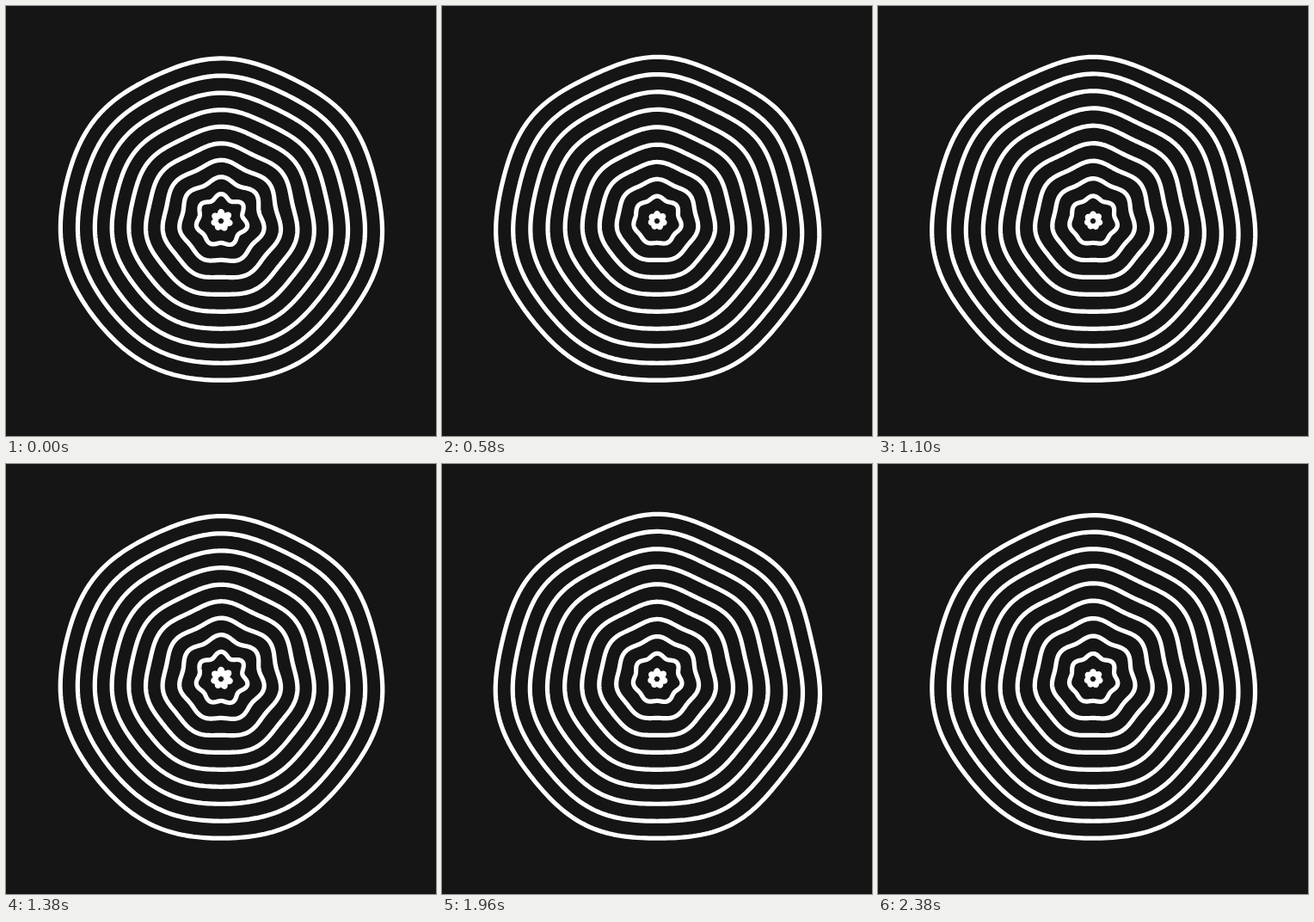
Recreate the animation shown at these times as an HTML page. Size 500 by 500 pixels, loop 2400 ms.

```html
<!DOCTYPE html>
<html lang="en">
<head>
<meta charset="utf-8">
<title>Vibrating rings</title>
<style>
  html, body { margin: 0; width: 100%; height: 100%; overflow: hidden; background: #151515; }
  svg { display: block; width: 100%; height: 100%; }
  path { fill: none; stroke: #fff; stroke-width: 5.2; stroke-linejoin: round; }
</style>
</head>
<body>
<svg viewBox="0 0 500 500"></svg>
<script>
  const RINGS = 10, LOBES = 7, STEP = 20, STEPS = 120, TAU = Math.PI * 2;
  const svg = document.querySelector('svg');
  const rings = Array.from({ length: RINGS }, () =>
    svg.appendChild(document.createElementNS('http://www.w3.org/2000/svg', 'path')));

  const wave = turns => Math.cos(TAU * turns);

  // Lobe height: a slow swell plus a quick ripple running across the rings
  const lobe = (ring, step) =>
    4 - 0.4 * wave((step - 30) / STEPS) + wave(ring / 14 - 47 * step / STEPS - 0.6);

  // Troughs stay put; lobes swell outwards, more so towards the upper right
  function outline(ring, height) {
    const base = 185.2 - 19.97 * ring;
    const count = 252;
    let d = '';
    for (let k = 0; k < count; k++) {
      const turn = k / count, a = TAU * turn;
      const lean = 1 + 0.3 * wave(turn - 0.125);
      const r = base + height * lean * (1 + wave(LOBES * turn)) / 2;
      d += (k ? 'L' : 'M') + (250 + r * Math.sin(a)).toFixed(2) + ' ' + (250 - r * Math.cos(a)).toFixed(2);
    }
    return d + 'Z';
  }

  let last = -1;
  function draw() {
    const step = Math.floor(performance.now() / STEP) % STEPS;
    if (step !== last) {
      rings.forEach((path, i) => path.setAttribute('d', outline(i, lobe(i, step))));
      last = step;
    }
    requestAnimationFrame(draw);
  }
  draw();
</script>
</body>
</html>
```
